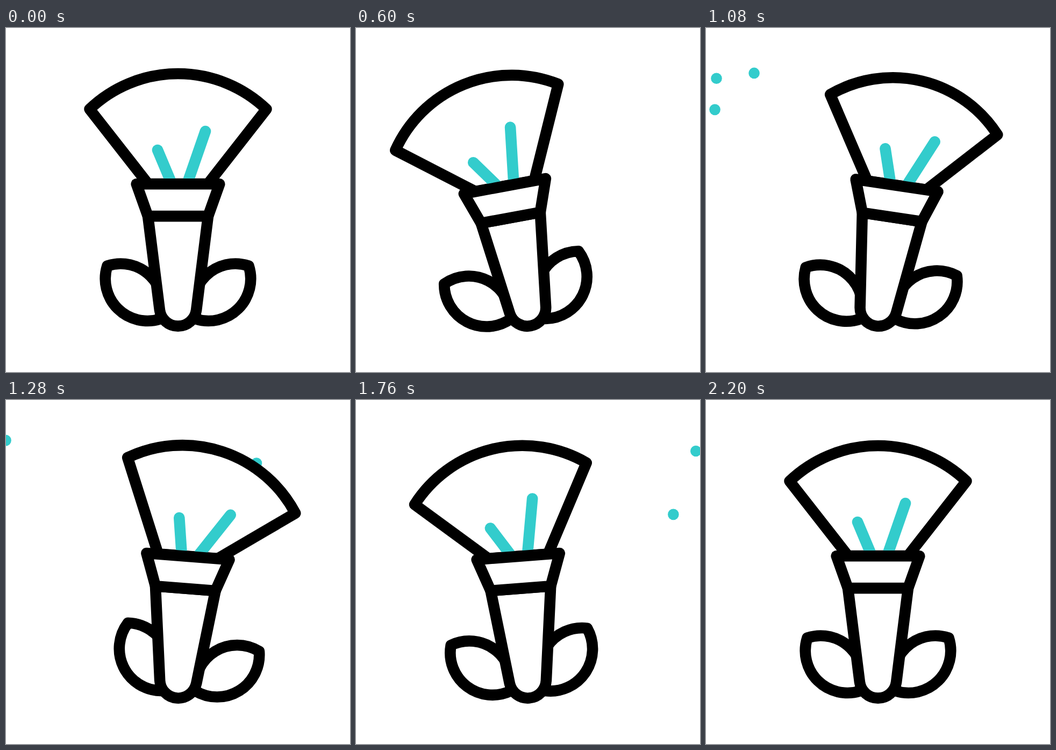
Write an HTML page that moves like this. It is 640 by 640 pixels and loops after 2400 ms.

```html
<!DOCTYPE html>
<html>
<head>
<meta charset="utf-8">
<title>Brush</title>
<style>
  html, body { margin: 0; height: 100%; overflow: hidden; background: #fff; }
  svg { display: block; width: 100vw; height: 100vh; }
  .ink { fill: #fff; stroke: #000; }
  .hair { fill: none; stroke: #33cccc; }
  .dots { fill: #33cccc; }
</style>
</head>
<body>
<svg viewBox="0 0 640 640" stroke-width="20.6" stroke-linecap="round" stroke-linejoin="round">
  <g id="dots" class="dots"></g>
  <path id="leftLeaf" class="ink" d="M188.5 442.5A78.5 78.5 0 0 1 288 541A78.5 78.5 0 0 1 188.5 442.5Z"/>
  <path id="rightLeaf" class="ink" d="M451.5 442.5A78.5 78.5 0 0 0 352 541A78.5 78.5 0 0 0 451.5 442.5Z"/>
  <g id="brush">
    <path id="fan" class="ink"/>
    <path id="hair" class="hair"/>
    <path class="ink" d="M264 350L285.9 524.8A34.4 34.4 0 0 0 354.1 524.8L376 350Z"/>
    <path class="ink" d="M242.7 290.3H397.3L376 350H264Z"/>
  </g>
</svg>
<script>
const LOOP = 2400, START = 200, DOT = 10.3;
const $ = id => document.getElementById(id);
const rad = deg => deg * Math.PI / 180;
const ease = x => x * x * (3 - 2 * x);

// A swing leaves rest at START, peaks every `step` ms from `first`, and rests again at `end`.
function swing(first, step, end, ...peaks) {
  const times = [START, ...peaks.map((_, i) => first + i * step), end];
  const poses = [0, ...peaks, 0];
  return (t, value = deg => deg) => {
    const i = times.findIndex(time => time > t);
    if (i < 1) return value(0);
    const x = (t - times[i - 1]) / (times[i] - times[i - 1]);
    const from = value(poses[i - 1]);
    return from + (value(poses[i]) - from) * ease(x);
  };
}

const fanSwing = swing(780, 480, 2200, -15, 14, -9.3);
const parts = [
  { id: 'brush', pivot: '320 527', angle: swing(660, 464, 1960, -11, 9, -8) },
  { id: 'leftLeaf', pivot: '288 540', angle: swing(810, 565, 2200, -23.5, 23, -17) },
  { id: 'rightLeaf', pivot: '352 540', angle: swing(700, 500, 2200, -21.4, 15, -12) }
];

// Dots pass their spots at time `at`; each flies a little faster and steeper than the one before.
const bursts = [
  { start: 750, at: 920, spots: [[162, 91], [97, 167], [108, 117], [42, 109]],
    velocity: i => [-.45 - .05 * i, -.044 - .05 * i] },
  { start: 1240, at: 1500, spots: [[494, 95], [582, 179], [590, 146], [438, 162]],
    velocity: i => [.53 + .018 * i, .065 * i] }
];

function drawFan(t) {
  // The tips travel straight between the peak poses; the roots stay in the collar.
  const c = fanSwing(t, deg => Math.cos(rad(deg)));
  const s = fanSwing(t, deg => Math.sin(rad(deg)));
  const tip = (x, y) => [320 + (x - 320) * c - (y - 290) * s, 290 + (x - 320) * s + (y - 290) * c];
  const r = 238 * Math.hypot(c, s);
  $('fan').setAttribute('d',
    `M264.3 290L${tip(155.5, 151)}A${r} ${r} 0 0 1 ${tip(484.5, 151)}L375.7 290Z`);
  $('hair').setAttribute('d', `M308.5 290L${tip(282, 227)}M337 290L${tip(371, 192)}`);
}

function drawDots(t) {
  const live = bursts.filter(b => t >= b.start);
  $('dots').innerHTML = live.flatMap(({ at, spots, velocity }) => spots.map(([x, y], i) => {
    const [vx, vy] = velocity(i);
    return `<circle cx="${x + vx * (t - at)}" cy="${y + vy * (t - at)}" r="${DOT}"/>`;
  })).join('');
}

function frame() {
  const t = performance.now() % LOOP;
  for (const { id, pivot, angle } of parts)
    $(id).setAttribute('transform', `rotate(${angle(t)} ${pivot})`);
  drawFan(t);
  drawDots(t);
  requestAnimationFrame(frame);
}
frame();
</script>
</body>
</html>
```
